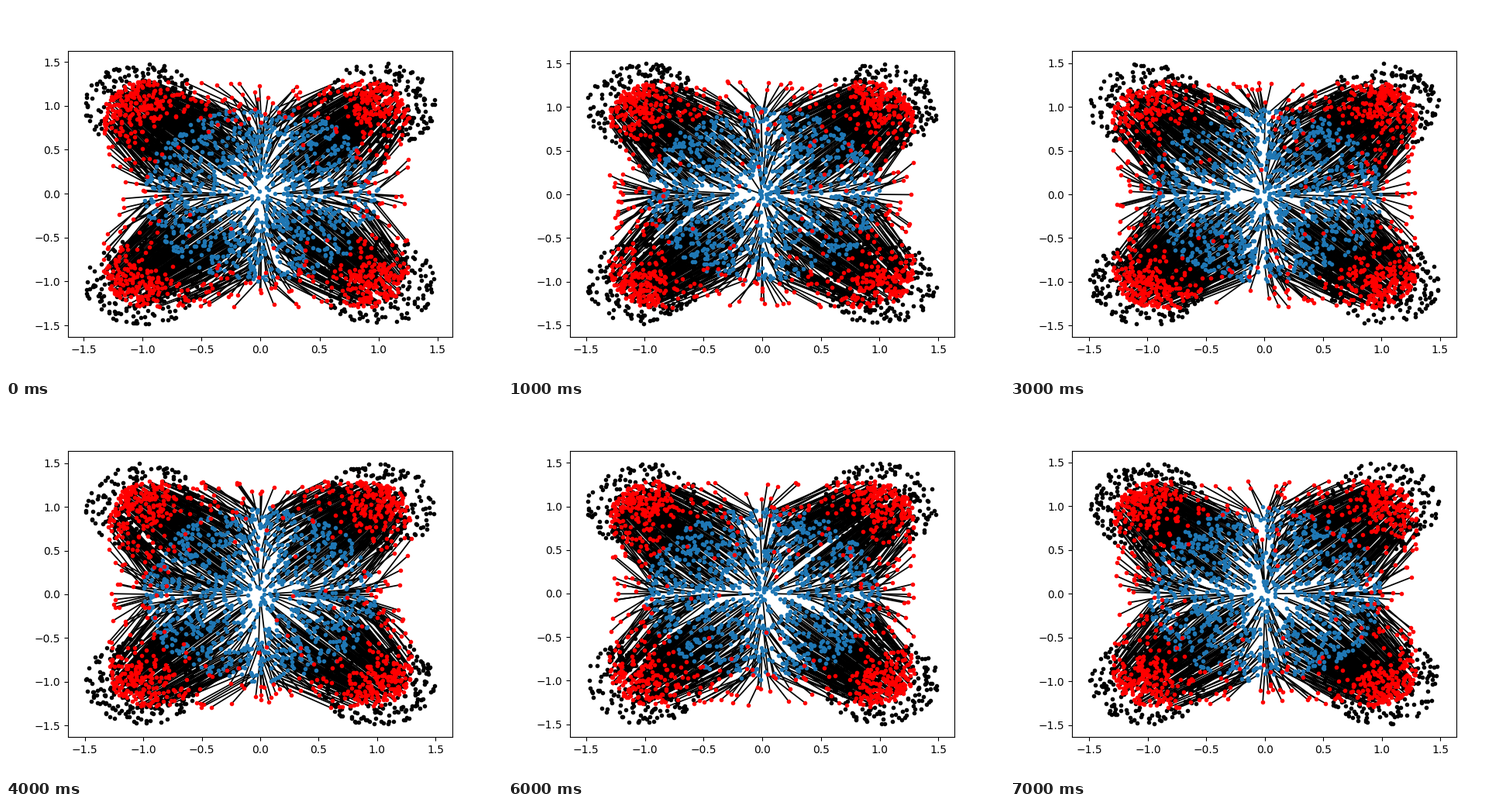
Write a matplotlib script that moves like this. It is 640 by 480 pixels and loops after 8000 ms.

```python
import numpy as np
import matplotlib.pyplot as plt
from matplotlib.animation import FuncAnimation
from matplotlib.collections import LineCollection

N = 1000
FRAMES = 8


def disc(rng, radius):
    """Uniform points in a disc."""
    r = radius * np.sqrt(rng.random(N))
    a = rng.uniform(0, 2 * np.pi, N)
    return np.column_stack([r * np.cos(a), r * np.sin(a)])


def generate(z):
    """Push the disc out into four rounded corner clusters."""
    r2 = np.maximum((z ** 2).sum(axis=1), 1e-9)
    diagonal = 2 * np.abs(z[:, 0] * z[:, 1]) / r2
    step = np.tanh(11 * z)
    return step * (0.71 + 0.06 * diagonal[:, None]) + 0.58 * z


fig, ax = plt.subplots(figsize=(6.4, 4.8), dpi=100)
arrows = LineCollection([], colors="k", linewidths=1.25, zorder=1)
ax.add_collection(arrows, autolim=False)
real, = ax.plot([], [], "k.")
latent, = ax.plot([], [], ".", color="#1f77b4")
fake, = ax.plot([], [], "r.")


def update(i):
    rng = np.random.default_rng(40 + i)
    corners = rng.choice([-1, 1], (N, 2))
    data = corners + disc(rng, 0.5)
    z = disc(rng, 1)
    g = generate(z)
    g[:, 0] -= 0.04 * np.exp(-2 * i)  # the bias fades as training goes on

    real.set_data(*data.T)
    latent.set_data(*z.T)
    fake.set_data(*g.T)
    arrows.set_segments(np.stack([z, g], axis=1))
    ax.relim()
    ax.autoscale_view()
    return arrows, real, latent, fake


anim = FuncAnimation(fig, update, frames=FRAMES, interval=1000,
                     repeat=True, repeat_delay=0, blit=False)
plt.show()
```
